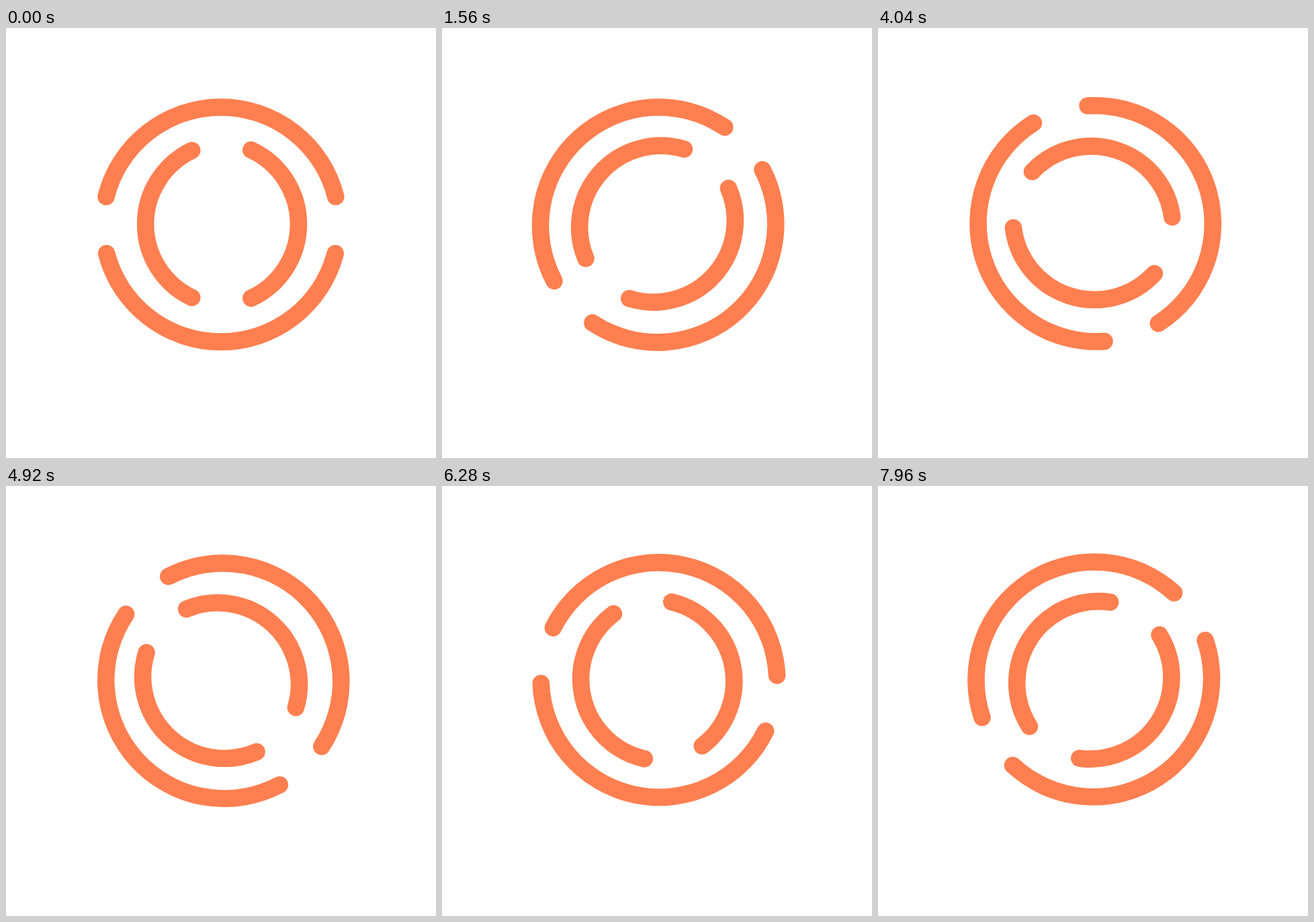
Recreate the animation shown at these times as an HTML page. Size 640x640 px, loop 8 s.

```html
<!DOCTYPE html>
<html lang="en">
<head>
<meta charset="utf-8">
<title>Counter-rotating rings</title>
<style>
  html, body {
    margin: 0;
    width: 100%;
    height: 100%;
    overflow: hidden;
    background: #fff;
  }
  svg {
    display: block;
    width: 100%;
    height: 100%;
  }
  path {
    fill: none;
    stroke: #ff7f50;
    stroke-width: 25.6;
    stroke-linecap: round;
  }
</style>
</head>
<body>
<svg viewBox="0 0 640 640">
  <g id="outer">
    <path d="M149 251A176.2 176.2 0 0 1 490.7 251"/>
    <path d="M149.6 335.6A176 176 0 0 0 490.2 335.6"/>
  </g>
  <g id="inner">
    <path d="M276.7 182.3A121.3 121.3 0 0 0 276.7 401.3"/>
    <path d="M364.8 181.5A121.55 121.55 0 0 1 364.8 402.2"/>
  </g>
</svg>
<script>
  const LOOP = 8000;
  const STEP_DEG = 3;
  const PIVOT = "321.25 290.4";

  // The rings tick in a slightly uneven beat: ten ticks per bar.
  const BAR = 1120;
  const TICKS = [0, 120, 220, 330, 440, 560, 680, 820, 920, 1020];

  const outer = document.getElementById("outer");
  const inner = document.getElementById("inner");

  function angleAt(time) {
    const bar = Math.floor(time / BAR);
    const tick = TICKS.filter(start => start <= time % BAR).length - 1;
    return (bar * TICKS.length + tick) * STEP_DEG;
  }

  function turn(ring, angle) {
    ring.setAttribute("transform", `rotate(${angle} ${PIVOT})`);
  }

  function draw() {
    const angle = angleAt((performance.now() - start) % LOOP);
    turn(outer, -angle);
    turn(inner, angle);
    requestAnimationFrame(draw);
  }

  const start = performance.now();
  draw();
</script>
</body>
</html>
```
